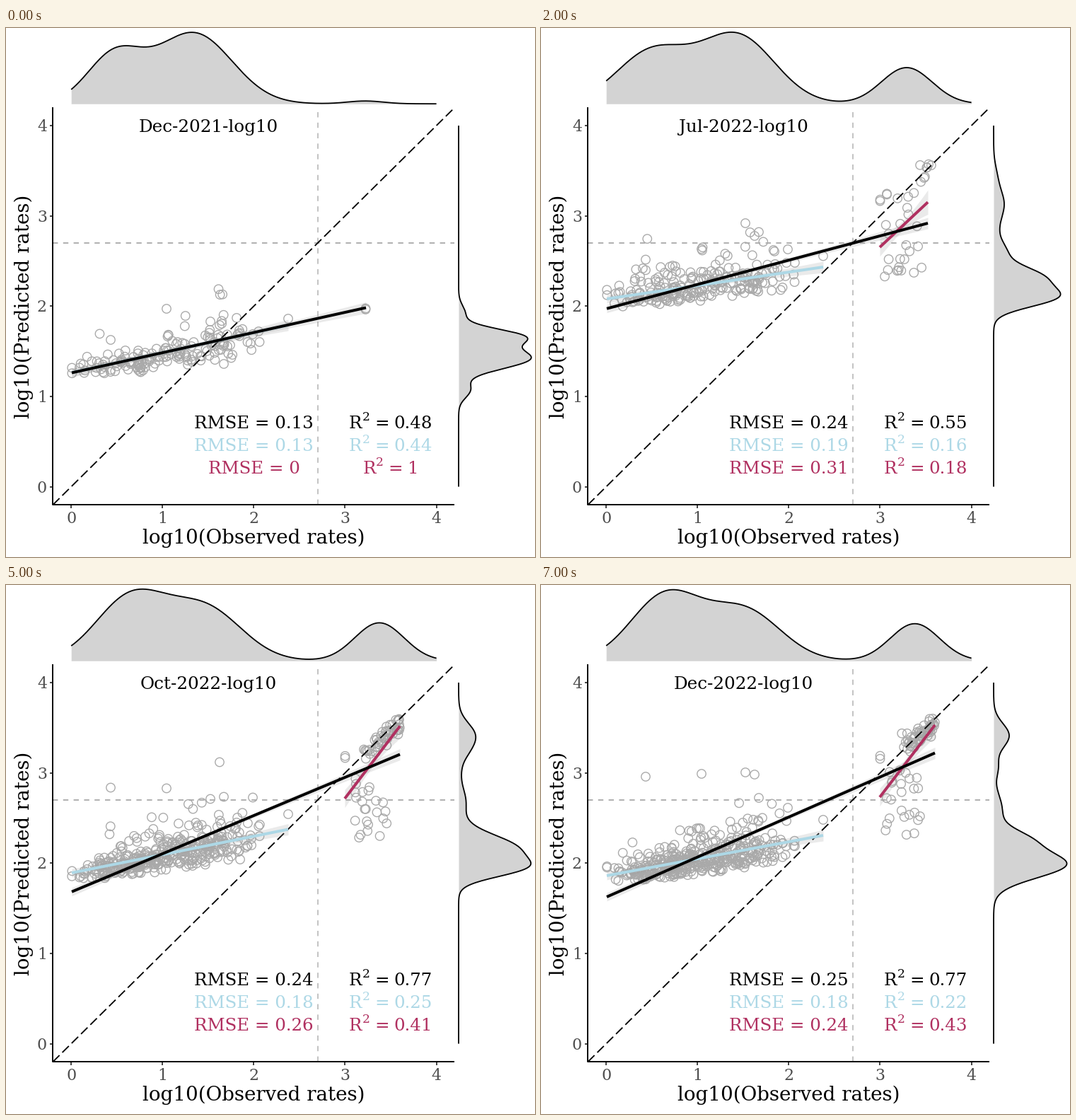
A matplotlib script for the animation above (8 s loop, 748 by 748 pixels).

```python
import numpy as np
import matplotlib.pyplot as plt
from matplotlib.animation import FuncAnimation

SIZE, DPI = 748, 100
PT = 72 / DPI  # points per pixel
plt.rcParams["font.family"] = "DejaVu Serif"
GREY = "#a9a9a9"
COLORS = ("black", "#add8e6", "#b03060")

fig = plt.figure(figsize=(SIZE / DPI, SIZE / DPI), dpi=DPI, facecolor="white")
ax = fig.add_axes([0, 0, 1, 1])
ax.set_xlim(0, SIZE)
ax.set_ylim(SIZE, 0)
ax.axis("off")


def px(v):
    return 92.2 + 129.1 * v


def py(v):
    return 648.6 - 127.65 * v


def line(xs, ys, color, width, z, dash=None):
    art, = ax.plot(xs, ys, color=color, lw=width * PT, zorder=z,
                   solid_capstyle="butt", dash_capstyle="butt")
    if dash:
        art.set_linestyle((0, [d / width for d in dash]))
    return art


def text(x, y, s, size, color="black", ha="center", **kw):
    return ax.text(x, y, s, fontsize=size * PT, color=color, ha=ha,
                   va="baseline", zorder=9, **kw)


def humps(v, params):
    """Sum of bells, each given as centre, width, height."""
    return sum(h * np.exp(-.5 * ((v - c) / w) ** 2)
               for c, w, h in zip(params[::3], params[1::3], params[2::3]))


TOP_X = np.linspace(0, 4, 400)
SIDE_Y = np.linspace(py(4), py(0), 400)
ODD_X = (148, 227, 289, 302, 308, 349, 399)  # places far off the low trend


def month(title, rmse, r2, top, side, end, fits, cloud, odd):
    """fits: y at both ends (all, low, high); end: x where two of them stop.
    cloud: low count, floor, scattered high count, its upper y, cluster count."""
    return dict(title=title, rmse=rmse.split(), r2=r2.split(), end=end,
                top=humps(TOP_X, top), side=humps(SIDE_Y, side),
                fits=np.array(fits), cloud=np.array(cloud), odd=np.array(odd))


def between(a, b, title, rmse, r2):
    mid = {k: (a[k] + b[k]) / 2
           for k in ("top", "side", "end", "fits", "cloud", "odd")}
    return dict(title=title, rmse=rmse.split(), r2=r2.split(), **mid)


dec21 = month("Dec-2021", "0.13 0.13 0", "0.48 0.44 1",
              [.47, .3, 67, 1.34, .42, 100, 3.22, .2, 4],
              [403, 11, 9, 436, 11, 83, 467, 15, 101, 512, 11, 16],
              509, [487.5, 395.5, 487.3, 420, 397, 397],
              [165, 489, 0, 0, 0], [441, 397, 415, 420, 475, 433, 411])
sep19 = month("Sep-2019", "0.24 0.22 0.32", "0.44 0.12 0.05",
              [.48, .38, 74, 1.4, .42, 97, 3.26, .275, 50],
              [255, 22, 15.5, 316, 14, 20, 346, 13, 38, 378, 14, 101],
              539, [388.5, 291, 381, 337, 308, 276.5],
              [205, 398, 31, 228, 0], [348, 345, 286, 324, 286, 298, 331])
aug22 = month("Aug-2022", "0.23 0.16 0.3", "0.66 0.2 0.3",
              [.52, .4, 72, 1.46, .4, 96, 3.32, .275, 53],
              [208, 16, 7, 245, 20, 15, 288, 14, 6, 318, 16, 14,
               355, 15, 95, 385, 12.5, 66],
              555, [405, 261, 385, 339, 312, 216],
              [245, 398, 23, 236, 17], [307, 280, 266, 264, 291, 328, 314])
sep22 = month("Sep-2022", "0.23 0.18 0.26", "0.76 0.28 0.4",
              [.64, .39, 89, 1.45, .4, 74, 3.37, .27, 53],
              [216, 18, 21, 256, 17, 6, 303, 17, 11, 364, 18, 68, 398, 13.5, 93],
              557, [433, 241.5, 409, 342, 303, 201],
              [350, 416, 26, 250, 42], [285, 285, 280, 257, 302, 294, 338])
nov22 = month("Nov-2022", "0.24 0.17 0.26", "0.77 0.23 0.41",
              [.67, .38, 90, 1.49, .4, 72, 3.38, .27, 54.5],
              [211, 17, 26, 236, 12, 9, 318, 25, 11, 376, 17, 98, 404, 12, 60],
              557, [434.5, 237.5, 405, 349, 301, 198],
              [375, 414, 24, 284, 52], [288, 290, 325, 244, 297, 307, 310])
dec22 = month("Dec-2022", "0.25 0.18 0.24", "0.77 0.22 0.43",
              [.65, .38, 92, 1.51, .4, 71, 3.38, .27, 52.5],
              [213, 17, 22, 258, 13, 6, 318, 22, 12, 359, 14, 38, 395, 19, 102],
              557, [441, 237.5, 411, 354, 300, 198],
              [390, 419, 26, 262, 54], [271, 267, 265, 268, 301, 315, 332])

MONTHS = [
    dec21, sep19,
    between(sep19, aug22, "Jul-2022", "0.24 0.19 0.31", "0.55 0.16 0.18"),
    aug22, sep22,
    between(sep22, nov22, "Oct-2022", "0.24 0.18 0.26", "0.77 0.25 0.41"),
    nov22, dec22]


def scatter_points(m, seed):
    n, floor, n_mid, mid_top, n_high = (int(v) for v in m["cloud"])
    base = np.random.default_rng(5)
    x = np.abs(base.normal(np.where(base.random(400) < .5, .66, 1.4), .33))
    x = np.where(x > 2.1, x - .8, x)[:n]

    # low rates: skewed spread around the low trend
    rng = np.random.default_rng(20 + seed)
    y0, y1 = m["fits"][2:4]
    skew = (rng.gamma(3, 1, n) - 3) / np.sqrt(3)
    skew = np.where((skew > 1) & (rng.random(n) < .25), skew * 1.6, skew)
    y = y0 + (px(x) - 93) / 306 * (y1 - y0) - (9 + 5.5 * x) * skew
    y = floor - np.abs(floor - y)

    # high rates: loose scatter, then a cluster along the diagonal
    mx = 486 + 53 * rng.random(n_mid)
    mx[:2] = 479.5
    my = rng.uniform(mid_top, 358, n_mid)
    my[:2] = 240 + 6 * rng.random(len(my[:2]))
    t = rng.beta(1.6, 1.1, n_high)
    hy = np.maximum(238 - 43 * t + rng.normal(0, 7, n_high), 189)
    far = [508.5] * 2 if n_mid == 0 else []
    return (np.concatenate([px(x), mx, 505 + 52 * t, ODD_X, far]),
            np.concatenate([y, my, hy, m["odd"], [398, 396.5][:len(far)]]))


def draw_static():
    left, right, top, bottom = px(-.2), px(4.2), py(4.2), py(-.2)
    line([left, right], [py(2.7)] * 2, GREY, 1.8, 2, (7.4, 7.4))
    line([px(2.7)] * 2, [bottom, top], "#bebebe", 1.8, 2, (7.4, 7.4))
    line([left, right], [bottom, top], "black", 1.85, 2.5, (13, 5.6))
    line([left, left, right], [top, bottom, bottom], "black", 1.9, 6)
    for v in range(5):
        line([px(v)] * 2, [bottom, bottom + 4.5], "#333333", 1.8, 5)
        line([left - 4.5, left], [py(v)] * 2, "#333333", 1.8, 5)
        text(px(v), 700, str(v), 22.2, "#4d4d4d")
        text(58, py(v) + 8, str(v), 22.2, "#4d4d4d", "right")
    text(350.5, 729, "log10(Observed rates)", 27.8)
    text(32.8, 394, "log10(Predicted rates)", 27.8, rotation=90,
         rotation_mode="anchor")


def draw_fit(x0, x1, y0, y1, spread, color):
    t = np.linspace(0, 1, 50)
    x, y = x0 + (x1 - x0) * t, y0 + (y1 - y0) * t
    half = spread * (.85 + .3 * t) * np.sqrt(.2 + .8 * (2 * t - 1) ** 2)
    z = 4.5 if color == "black" else 4
    return [ax.fill_between(x, y - half, y + half, color="#999999", alpha=.2,
                            lw=0, zorder=3),
            line(x, y, color, 4, z)]


def draw_r2(value, y, color):
    em = 24.5
    width = 63.4 + em * (.636 * len(value) - .318 * ("." in value))
    x = 544 - width / 2
    return [text(x, y, "R", em, color, "left"),
            text(x + 18.4, y - 10.5, "2", 17, color, "left"),
            text(x + 36.1, y, "=", em, color, "left"),
            text(x + 63.4, y, value, em, color, "left")]


live = []


def update(i):
    while live:
        live.pop().remove()
    m = MONTHS[i]
    x, y = scatter_points(m, i)
    live.append(ax.scatter(x, y, s=(12.4 * PT) ** 2, facecolors="none",
                           edgecolors=GREY, linewidths=1.35 * PT, zorder=1))
    f, end = m["fits"], m["end"]
    live.extend(draw_fit(93, end, f[0], f[1], 7, COLORS[0]))
    live.extend(draw_fit(93, 399, f[2], f[3], 7, COLORS[1]))
    if m["cloud"][2]:
        spread = 28 if end < 545 else 15
        live.extend(draw_fit(479, end, f[4], f[5], spread, COLORS[2]))

    top_x, edge = px(TOP_X), 107.2 - m["top"]
    live.append(ax.fill_between(top_x, 107.2, edge, color="#d3d3d3", lw=0))
    live.append(line(top_x, edge, "black", 1.8, 5))
    edge = 640 + m["side"]
    live.append(ax.fill_betweenx(SIDE_Y, 640, edge, color="#d3d3d3", lw=0))
    live.append(line(edge, SIDE_Y, "black", 1.8, 5))

    live.append(text(286, 147, m["title"] + "-log10", 24.6))
    for k, color in enumerate(COLORS):
        base = 565.8 + 32 * k
        live.append(text(350.5, base, "RMSE = " + m["rmse"][k], 24.5, color))
        live.extend(draw_r2(m["r2"][k], base, color))
    return live


draw_static()
anim = FuncAnimation(fig, update, frames=len(MONTHS), interval=1000,
                     init_func=lambda: update(0), repeat=True, blit=False)
plt.show()
```
